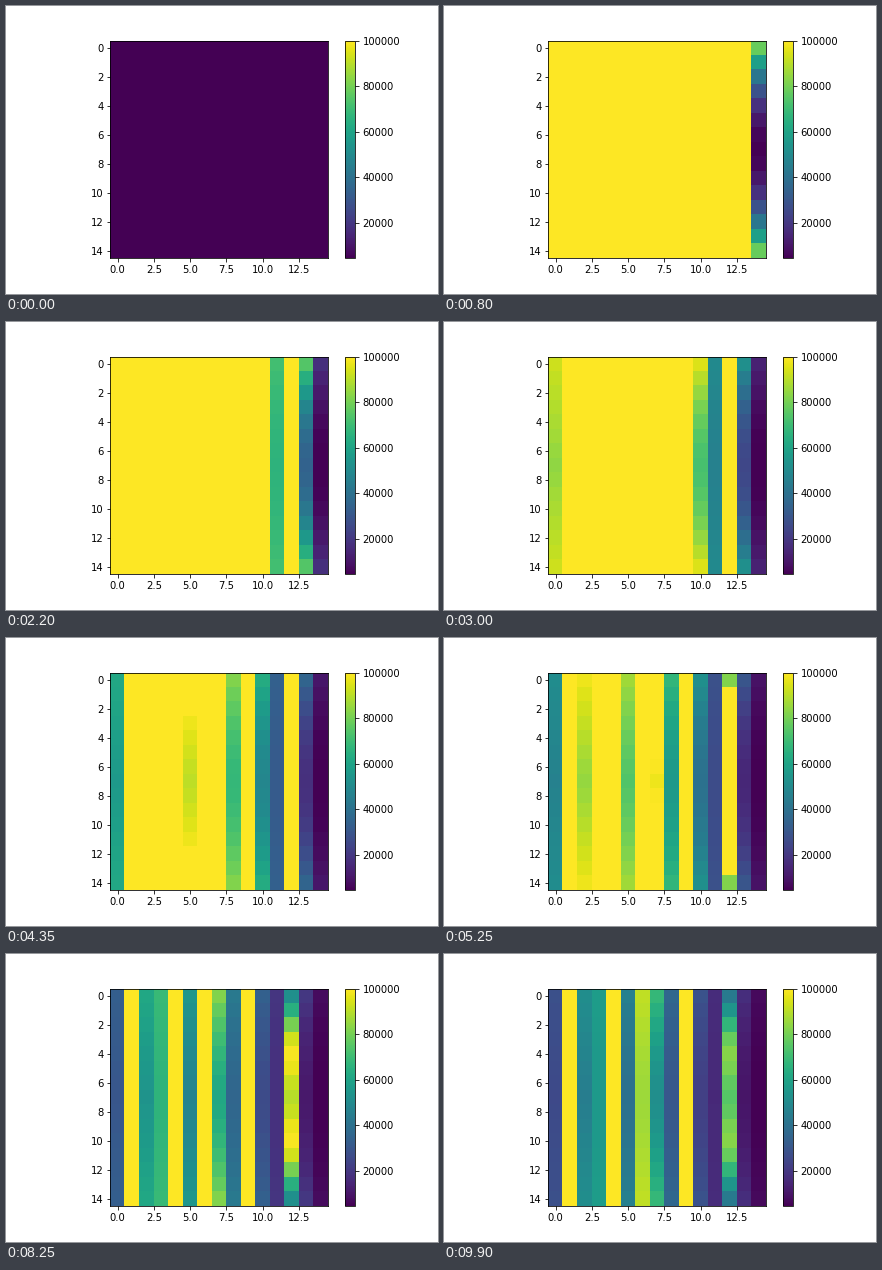
Write a matplotlib script that moves like this. It is 432 by 288 pixels and loops after 10000 ms.

```python
import numpy as np
import matplotlib.pyplot as plt
from matplotlib.animation import FuncAnimation

N = 15          # cells per side
FRAMES = 200
STEP = 50       # ms
WARMUP = 10     # frames before the decay begins
LOW, HIGH = 4600, 100000
BUMP_COL, BUMP = 12, 140

# Strength of each column, in thousands, on the middle row and on the outer rows.
MIDDLE = np.array([199, 1000, 381, 480, 1000, 331, 765, 442,
                   244, 1000, 169, 105, 660, 51, 0])
OUTER = np.array([220, 1000, 441, 497, 1000, 389, 812, 598,
                  298, 1000, 226, 113, 367, 119, 22])


def strength():
    """Blend middle to outer; the curve goes from linear (left) to parabolic."""
    u = np.abs(np.linspace(-1, 1, N))[:, None]
    power = np.linspace(1, 2, N)
    field = MIDDLE + (OUTER - MIDDLE) * u ** power
    field[:, BUMP_COL] += BUMP * np.sin(np.pi * u[:, 0]) ** 2
    return field * 1000


FIELD = strength()


def state(n):
    """Each cell falls off as 1/t towards the floor once the warm-up is over."""
    if n <= WARMUP:
        return np.full((N, N), float(LOW))
    seconds = (n - WARMUP) * STEP / 1000
    return np.clip(LOW + FIELD / seconds, LOW, HIGH)


plt.rcParams.update({"font.family": "DejaVu Sans", "font.size": 10,
                     "figure.subplot.bottom": 0.125})
fig, ax = plt.subplots(figsize=(6, 4), dpi=72, facecolor="white")
image = ax.imshow(state(0), cmap="viridis", vmin=LOW, vmax=HIGH,
                  interpolation="nearest")
fig.colorbar(image, ax=ax)


def update(n):
    image.set_data(state(n))
    return (image,)


anim = FuncAnimation(fig, update, frames=FRAMES, interval=STEP,
                     repeat=True, repeat_delay=0, blit=False)
plt.show()
```
